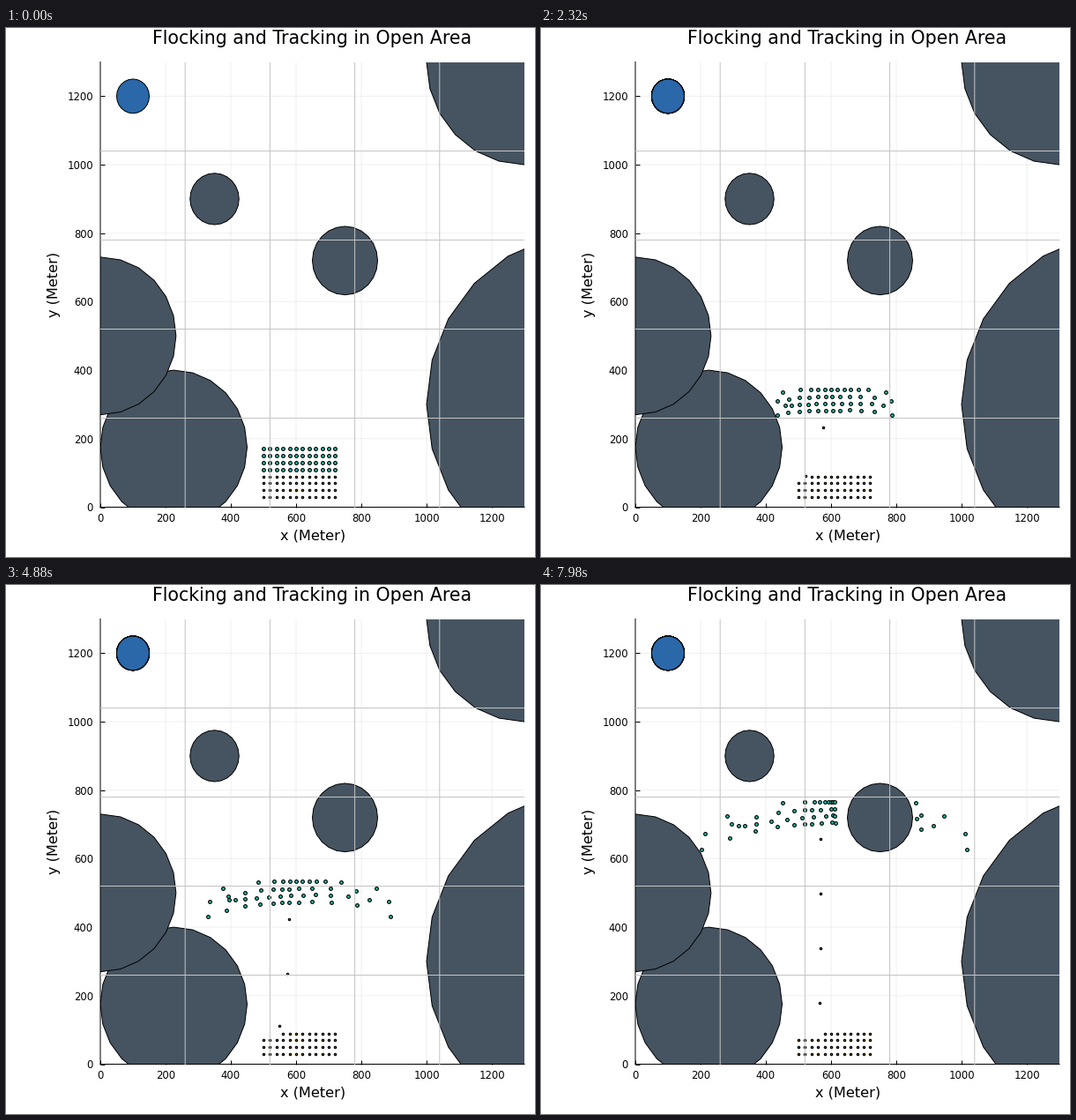
A matplotlib script for the animation above (8 s loop, 600 by 600 pixels).

```python
import numpy as np
import matplotlib.pyplot as plt
from matplotlib.animation import FuncAnimation
from matplotlib.patches import Polygon

SIZE, DPI = 600, 100
STEP, FRAMES = 20, 400      # ms per frame, frames per loop
SPEED = 0.0747              # metres per ms
PX = 72 / DPI               # one pixel in points
SLATE, BLUE, TEAL, GOLD = "#465461", "#2a68a9", "#20c5ae", "#dcae3c"

plt.rcParams["font.family"] = "DejaVu Sans"
fig = plt.figure(figsize=(SIZE / DPI, SIZE / DPI), dpi=DPI, facecolor="white")
ax = fig.add_axes([107 / SIZE, 56.5 / SIZE, 481 / SIZE, 505 / SIZE])
ax.set(xlim=(0, 1300), ylim=(0, 1300))
ax.set_xticks(range(0, 1300, 200))
ax.set_yticks(range(0, 1300, 200))
ax.tick_params(direction="in", length=5 * PX, width=PX, labelsize=8.4)
ax.tick_params(axis="x", pad=6.8 * PX)
ax.tick_params(axis="y", pad=8 * PX)
for side, spine in ax.spines.items():
    spine.set(linewidth=PX, snap=False, visible=side in ("left", "bottom"))


def label(x, y, text, size, turn=0):
    fig.text(x / SIZE, 1 - y / SIZE, text, size=size, rotation=turn,
             rotation_mode="anchor", ha="center", va="baseline")


label(347.5, 18.3, "Flocking and Tracking in Open Area", 14.8)
label(347.8, 580.2, "x (Meter)", 11.6)
label(59.2, 291, "y (Meter)", 11.6, 90)


def grid(values, zorder, **style):
    for v in values:
        ax.axvline(v, lw=PX, zorder=zorder, snap=False, **style)
        ax.axhline(v, lw=PX, zorder=zorder, snap=False, **style)


grid(range(200, 1300, 200), 0.5, color="black", alpha=0.06)
grid(range(260, 1300, 260), 6, color="#c4c4c4")


def disc(x, y, r, color):
    a = np.radians(np.arange(0, 360, 15))
    pts = np.column_stack([x + r * np.cos(a), y + r * np.sin(a)])
    return ax.add_patch(Polygon(pts, fc=color, ec="black", lw=PX, zorder=2))


for x, y, r in [(225, 175, 225), (2, 500, 230), (350, 900, 75),
                (750, 720, 100), (1300, 1300, 300), (1500, 300, 500)]:
    disc(x, y, r, SLATE)

# The goal is redrawn on top of itself, so its edge soon hardens.
goal = [disc(100, 1200, 50, BLUE) for _ in range(20)]


def block(top):
    """Four rows of twelve, 20 m apart."""
    x, y = np.meshgrid(np.arange(500, 721, 20.0), top - 20.0 * np.arange(4))
    return np.column_stack([x.ravel(), y.ravel()])


def ease(u):
    u = np.clip(u, 0, 1)
    return u * u * (3 - 2 * u)


birds, parked = block(170), block(90)

# Every bird keeps its speed; the outer columns fan out, by row.
col = (birds[:, 0] - 610) / 110
reach = np.repeat([125, 165, 105, 170], 12)
bend = np.repeat([6, 2.2, 1.2, 2.2], 12)
sag = np.repeat([0, 42, 42, 42], 12)
drift = np.sign(col) * reach * np.abs(col) ** bend - sag * (1 - col ** 4)
FAN_START, FAN_TIME = 700, 4180

# The flock parts around the middle obstacle.
SPLIT, GAP = 735, 125


def fan(t):
    dx = drift * max(0, t - FAN_START) / FAN_TIME
    dy = np.sqrt(np.maximum((SPEED * t) ** 2 - dx ** 2, 0))
    return birds[:, 0] + dx, birds[:, 1] + dy


turn = np.sign(fan(FRAMES * STEP)[0] - SPLIT)


def flock_at(t):
    x, y = fan(t)
    clear = np.maximum(turn * (x - SPLIT), 0)
    around = SPLIT + turn * (clear ** 4 + GAP ** 4) ** 0.25
    x = x + ease((y - 560) / 160) * (around - x)
    return np.column_stack([x, y])


def trackers_at(t):
    """Trackers leave one after another and curve in behind the flock."""
    spots = parked.copy()
    age = np.maximum(0, t - 60 - 2240 * np.arange(4))
    dx = (600 - 0.004 * t - spots[:4, 0]) * (1 - np.exp(-age / 1200))
    spots[:4, 0] += dx
    spots[:4, 1] += SPEED * age - 0.35 * dx
    return spots


def dots(pts, width, edge, color):
    return ax.scatter(*pts.T, s=(width * PX) ** 2, c=color, edgecolors="black",
                      linewidths=edge * PX, zorder=4)


flock = dots(birds, 3.8, 1.1, TEAL)
trackers = dots(parked, 2.2, 1.3, GOLD)


def update(i):
    t = i * STEP
    flock.set_offsets(flock_at(t))
    trackers.set_offsets(trackers_at(t))
    for n, patch in enumerate(goal):
        patch.set_visible(n <= i)
    return [flock, trackers, *goal]


anim = FuncAnimation(fig, update, frames=FRAMES, interval=STEP,
                     repeat=True, repeat_delay=0, blit=False)
plt.show()
```
